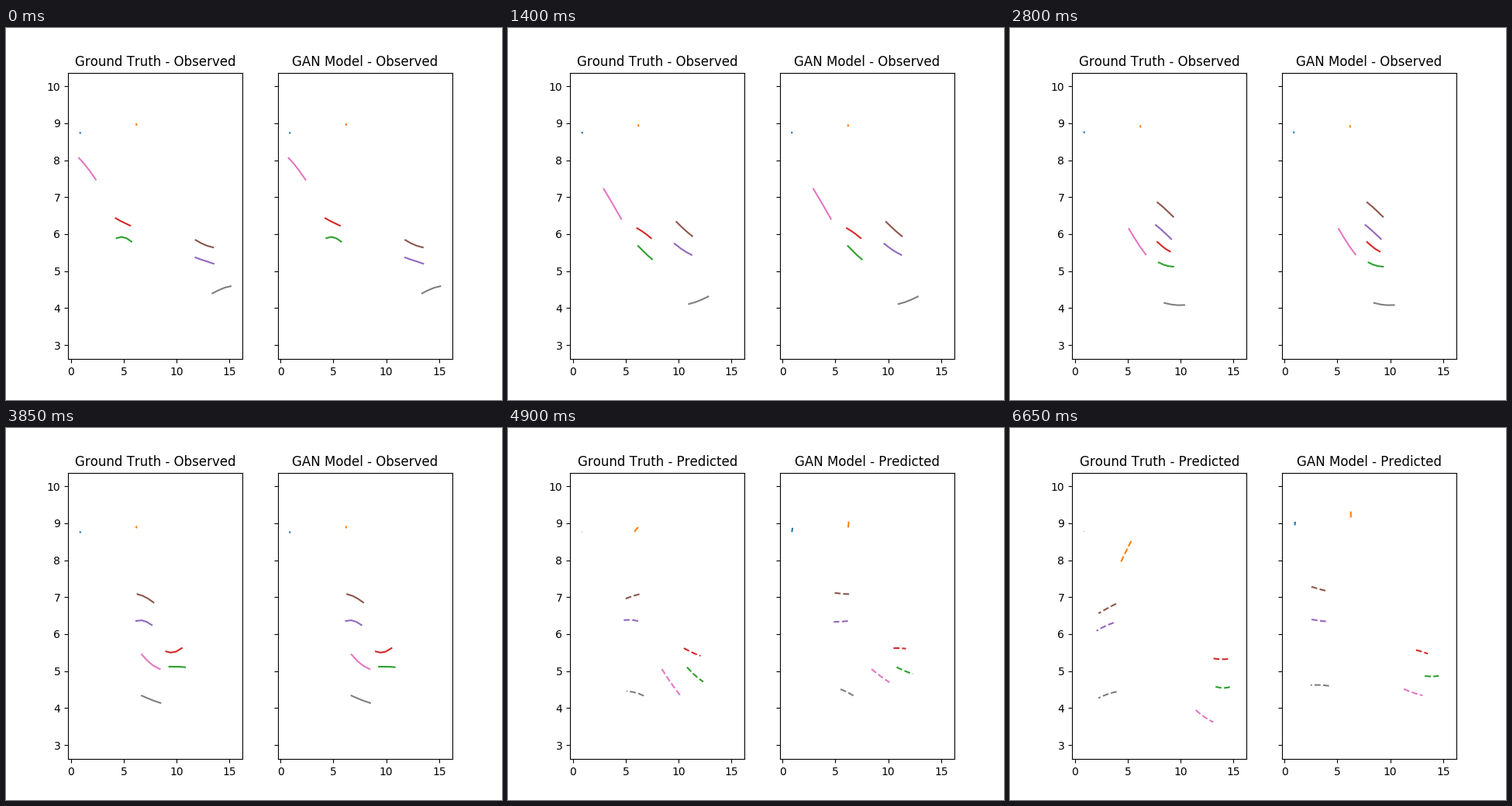
Write a matplotlib script that moves like this. It is 640 px wide and 480 px high and loops after 7 s.

```python
import matplotlib.pyplot as plt
import numpy as np
from matplotlib.animation import FuncAnimation

FRAMES = 20
INTERVAL = 350
WINDOW = 4                    # points visible at once
SPLIT, LAST = 14, 22          # last observed step, last step
OBSERVED = SPLIT - WINDOW + 2  # frames that show observed steps only

plt.rcParams["text.kerning_factor"] = 6

fig, axes = plt.subplots(1, 2, sharey=True, figsize=(6.4, 4.8), dpi=100)
for ax in axes:
    ax.set_xlim(-0.27, 16.26)
    ax.set_ylim(2.6196, 10.3676)

tracks = []


def curve(points, start, end):
    """Polynomial through evenly timed points, sampled at whole steps."""
    n = len(points)
    coefs = np.polyfit(np.linspace(start, end, n), points, n - 1)
    return np.vander(np.arange(start, end + 1), n) @ coefs


def add_walker(color, past, truth, model):
    """Add one walker: a shared past, then a future for each panel."""
    walked = curve(past, 0, SPLIT)
    for ax, future in zip(axes, (truth, model)):
        ahead = curve(past[-1:] + future, SPLIT, LAST)
        line, = ax.plot([], [], color=color, lw=1.5)
        tracks.append((line, np.vstack([walked, ahead[1:]])))


add_walker("C0", [(0.88, 8.735), (0.883, 8.76)],
           truth=[(0.885, 8.78)],
           model=[(0.96, 8.91), (1.0, 9.04)])

add_walker("C1", [(6.2, 8.975), (6.205, 8.885)],
           truth=[(5.58, 8.65), (4.36, 7.95)],
           model=[(6.27, 9.1), (6.26, 9.33)])

add_walker("C2", [(4.33, 5.89), (5.96, 5.74), (7.5, 5.32),
                  (9.08, 5.125), (10.8, 5.105)],
           truth=[(12.83, 4.63), (14.7, 4.57)],
           model=[(12.8, 4.89), (14.6, 4.87)])

add_walker("C3", [(4.24, 6.43), (5.85, 6.195), (7.4, 5.89),
                  (8.8, 5.56), (10.5, 5.62)],
           truth=[(12.6, 5.37), (14.65, 5.33)],
           model=[(12.06, 5.59), (13.55, 5.47)])

add_walker("C4", [(13.5, 5.2), (11.51, 5.4), (9.63, 5.74),
                  (7.9, 6.19), (6.18, 6.355)],
           truth=[(4.2, 6.35), (2.05, 6.09)],
           model=[(4.38, 6.335), (2.5, 6.4)])

add_walker("C5", [(13.46, 5.64), (11.55, 5.89), (9.8, 6.33),
                  (8.07, 6.8), (6.3, 7.08)],
           truth=[(4.42, 6.89), (2.24, 6.56)],
           model=[(4.36, 7.145), (2.37, 7.3)])

add_walker("C6", [(0.76, 8.06), (2.64, 7.35), (4.58, 6.41),
                  (6.44, 5.55), (8.42, 5.055)],
           truth=[(10.86, 4.11), (13.1, 3.62)],
           model=[(10.7, 4.6), (13.05, 4.34)])

add_walker("C7", [(15.12, 4.59), (13.1, 4.355), (10.98, 4.11),
                  (8.79, 4.115), (6.71, 4.335)],
           truth=[(4.52, 4.46), (2.24, 4.27)],
           model=[(4.75, 4.57), (2.47, 4.62)])


def update(i):
    observed = i < OBSERVED
    phase = "Observed" if observed else "Predicted"
    for ax, name in zip(axes, ("Ground Truth", "GAN Model")):
        ax.set_title(f"{name} - {phase}")
    for line, points in tracks:
        line.set_data(*points[i:i + WINDOW].T)
        line.set_linestyle("-" if observed else "--")
    return [line for line, _ in tracks]


anim = FuncAnimation(fig, update, frames=FRAMES, interval=INTERVAL,
                     repeat=True, repeat_delay=0)
plt.show()
```
